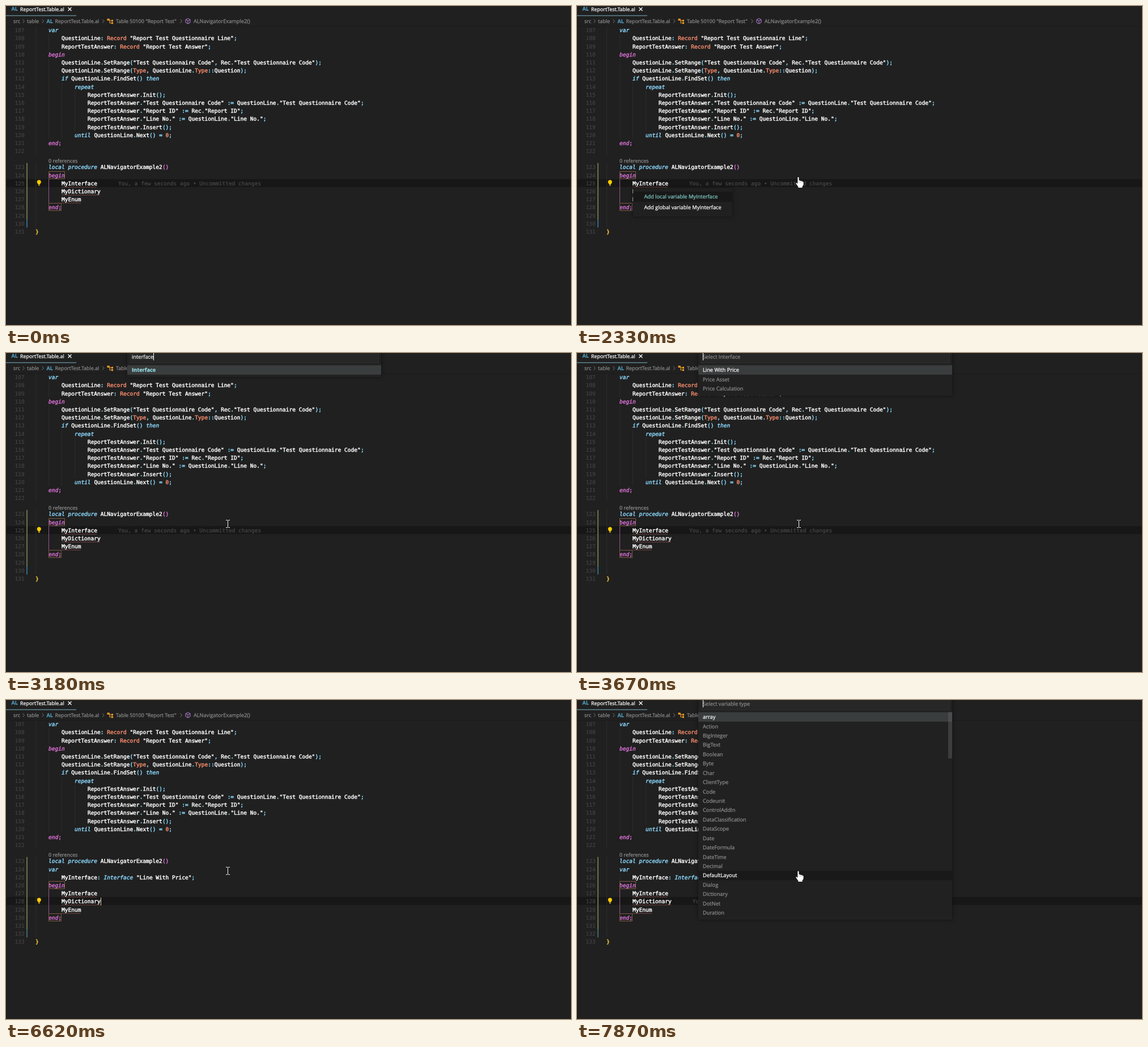
An HTML page with a canvas that plays this animation: 997 by 562 pixels, repeating every 8 s.

```html
<!DOCTYPE html>
<html lang="en">
<head>
<meta charset="utf-8">
<title>Add variable in the editor</title>
<style>
  html, body { margin: 0; width: 100%; height: 100%; overflow: hidden; background: #202020; }
  canvas { display: block; }
</style>
</head>
<body>
<canvas id="stage" width="997" height="562"></canvas>
<script>
const ctx = document.getElementById('stage').getContext('2d');
const LOOP = 8000, X0 = 52.1, CH = 5.738, ROW = 14.2;
const MONO = '9.53px "DejaVu Sans Mono", monospace';
const SANS = '"Open Sans", "Noto Sans", sans-serif';
const C = {
  bg: '#202020', line: '#171717', num: '#434343', guide: '#2b2b2b', text: '#ffffff',
  key: '#8ad6fa', block: '#da70d6', type: '#f78c6c', punct: '#89ddff', dim: '#484848',
  grey: '#8c8c8c', crumb: '#8a8a8a', match: '#80cbc4', wave: '#b0605a', blue: '#519aba'
};

const HEAD = `    var
        QuestionLine: Record "Report Test Questionnaire Line";
        ReportTestAnswer: Record "Report Test Answer";
    begin
        QuestionLine.SetRange("Test Questionnaire Code", Rec."Test Questionnaire Code");
        QuestionLine.SetRange(Type, QuestionLine.Type::Question);
        if QuestionLine.FindSet() then
            repeat
                ReportTestAnswer.Init();
                ReportTestAnswer."Test Questionnaire Code" := QuestionLine."Test Questionnaire Code";
                ReportTestAnswer."Report ID" := Rec."Report ID";
                ReportTestAnswer."Line No." := QuestionLine."Line No.";
                ReportTestAnswer.Insert();
            until QuestionLine.Next() = 0;
    end;
`.split('\n');
const BODY = `    begin
        MyInterface
        MyDictionary
        MyEnum
    end;


}`.split('\n');
const PROC = '    local procedure ALNavigatorExample2()';
const NEW_VAR = ['    var', '        MyInterface: Interface "Line With Price";'];
const WORDS = ['MyInterface', 'MyDictionary', 'MyEnum'];

const TYPES = ('array Action BigInteger BigText Boolean Byte Char ClientType Code Codeunit ' +
  'ControlAddIn DataClassification DataScope Date DateFormula DateTime Decimal ' +
  'DefaultLayout Dialog Dictionary DotNet Duration').split(' ');
const IN_TYPES = ('Integer Instream Interface ControlAddIn BigInteger ErrorInfo ModuleDependencyInfo ' +
  'ModuleInfo SessionSettings TextEncoding XmlProcessingInstruction').split(' ');
const PICKS = [
  { from: 2490, to: 2720, hint: 'Select variable type', items: TYPES, hover: 17 },
  { from: 2720, to: 2800, query: 'in', items: IN_TYPES },
  { from: 2800, to: 2950, query: 'inte', items: ['Integer', 'Interface', 'BigInteger'] },
  { from: 2950, to: 3180, query: 'inter', items: ['Interface'] },
  { from: 3180, to: 3580, query: 'interface', items: ['Interface'] },
  { from: 3670, to: 5310, hint: 'Select Interface', items: ['Line With Price', 'Price Asset', 'Price Calculation'] },
  { from: 7870, to: LOOP, hint: 'Select variable type', items: TYPES, hover: 17 }
];
// start, end, x, line number
const CARETS = [
  [400, 930, 161, 125], [1460, 1860, 161, 125], [3580, 3670, 161, 125], [5310, 5380, 161, 125],
  [5380, 5840, 161, 127], [6070, 6390, 161, 128], [6390, 6920, 167, 128]
];

const during = (t, a, b) => t >= a && t < b;
const rowY = n => Math.round(n < 123 ? 42.2 + (n - 107) * ROW : 283.4 + (n - 123) * ROW);
const colX = n => X0 + n * CH;

function rect(x, y, w, h, color) {
  ctx.fillStyle = color;
  ctx.fillRect(x, y, w, h);
}
function path(points, color, width = 1, fill = false) {
  ctx.beginPath();
  points.forEach(([x, y], i) => i ? ctx.lineTo(x, y) : ctx.moveTo(x, y));
  if (fill) {
    ctx.closePath();
    ctx.fillStyle = fill;
    ctx.fill();
  }
  ctx.strokeStyle = color;
  ctx.lineWidth = width;
  ctx.stroke();
}
// a thin outline gives small type its full brightness
function type(str, x, y, color, heft) {
  ctx.fillStyle = ctx.strokeStyle = color;
  ctx.lineWidth = heft;
  ctx.fillText(str, x, y);
  ctx.strokeText(str, x, y);
}
function label(str, x, y, color, size = 9.25, weight = 400) {
  ctx.font = `${weight} ${size}px ${SANS}`;
  type(str, x, Math.round(y + 3.2), color, .25);
  return ctx.measureText(str).width;
}
function mono(str, x, y, color, italic, heft = .45) {
  ctx.font = (italic ? 'italic ' : '') + MONO;
  type(str, x, y + 4, color, heft);
}
function shadowBox(x, y, w, h, color) {
  ctx.save();
  ctx.shadowColor = 'rgba(0,0,0,.5)';
  ctx.shadowBlur = 6;
  rect(x, y, w, h, color);
  ctx.restore();
}

function style(token, line) {
  if (/^(var|if|then|repeat|until|local|procedure|Interface)$/.test(token)) return [C.key, true];
  if (/^(begin|end)$/.test(token)) return [C.block, true];
  if (/^(Record|Type|\d+)$/.test(token)) return [C.type, false];
  if (token === '}') return ['#ffd23c', false];
  if (/^[()]+$/.test(token) && line.includes('procedure')) return [C.block, false];
  if (token === ';' && line.trim() === 'end;') return [C.block, false];
  if (/^["\w]/.test(token)) return [C.text, false];
  return [C.punct, false];
}
function codeLine(line, n) {
  const y = rowY(n);
  mono(String(n), 15.5, y, C.num, false, .2);
  for (const m of line.matchAll(/"[^"]*"|\w+|[()]+|[^\s\w"()]+/g)) {
    mono(m[0], colX(m.index), y, ...style(m[0], line));
  }
}
function squiggle(x, w, y) {
  const pts = [];
  for (let i = 0; i <= w; i += 2) pts.push([x + i, y + (i / 2 % 2 ? 0 : 1.6)]);
  path(pts, C.wave, .6);
}

function chevron(x) {
  path([[x, 23.5], [x + 3, 26.7], [x, 30]], '#777');
}
function header() {
  label('AL', 9.5, 5, C.blue, 9, 700);
  label('ReportTest.Table.al', 25, 5.5, '#fff', 8.9);
  path([[109.5, 2.5], [115.5, 8.5]], '#fff', 1.2);
  path([[115.5, 2.5], [109.5, 8.5]], '#fff', 1.2);
  rect(0, 16.5, 124, 1, '#7fb4c8');
  label('src', 13, 26.5, C.crumb, 9);
  chevron(29.5);
  label('table', 37, 26.5, C.crumb, 9);
  chevron(63.5);
  label('AL', 71.5, 26.5, C.blue, 9, 700);
  label('ReportTest.Table.al', 86.5, 26.5, C.crumb, 8.9);
  chevron(170);
  path([[180, 24], [183, 24], [183, 30], [187, 30]], '#ee9d28', 1.1);
  path([[183, 26], [187, 26]], '#ee9d28', 1.1);
  rect(178.5, 22.3, 4, 3.4, '#ee9d28');
  rect(186, 24.3, 3, 3, '#ee9d28');
  rect(186, 28.5, 3, 3, '#ee9d28');
  label('Table 50100 "Report Test"', 194, 26.5, C.crumb, 8.95);
  chevron(307.5);
  path([[321, 22], [325, 24], [325, 29], [321, 31.3], [317, 29], [317, 24], [321, 22]], '#b180d7');
  path([[317, 24], [321, 26.3], [325, 24]], '#b180d7');
  path([[321, 26.3], [321, 31.3]], '#b180d7');
  label('ALNavigatorExample2()', 331, 26.5, C.crumb, 9.2);
  rect(0, 35.5, 997, 1, '#1a1a1a');
}

function guide(col, a, b) {
  rect(Math.round(colX(col)), rowY(a) - 7, 1, rowY(b) - rowY(a) + ROW, C.guide);
}
function bulb(y) {
  ctx.beginPath();
  ctx.arc(58.3, y - 2, 3.5, 0, 7);
  ctx.fillStyle = '#ffcc00';
  ctx.fill();
  rect(56.6, y, 3.4, 2.6, '#ffcc00');
  rect(56.8, y + 3.3, 3, 1.4, '#c9a227');
}

function editor(t) {
  const added = t >= 5380;
  const shift = added ? 2 : 0;
  const tail = [PROC, ...(added ? NEW_VAR : []), ...BODY];
  const begin = 124 + shift, end = begin + 4;
  const current = !added ? 125 : t < 6070 ? 127 : 128;

  rect(0, rowY(current) - 7, 997, 14, C.line);
  guide(0, 107, 122);
  guide(0, 123, 130 + shift);
  guide(4, 108, 109);
  guide(4, 111, 120);
  guide(8, 114, 120);
  guide(12, 115, 119);
  if (added) guide(4, 125, 125);

  const split = rowY(130 + shift) - 7;
  rect(36, 276.5, 2, split - 276.5, '#69714b');
  rect(36, split, 2, ROW, added ? '#3f6670' : '#33698c');

  HEAD.forEach((s, i) => codeLine(s, 107 + i));
  label('0 references', 75, 272.5, '#8f8f8f', 8.95);
  tail.forEach((s, i) => codeLine(s, 123 + i));

  const top = rowY(begin), low = rowY(end);
  ctx.lineWidth = 1;
  ctx.strokeStyle = '#7c5945';
  ctx.strokeRect(75.5, top - 6.5, 28, 13);
  ctx.strokeRect(75.5, low - 6.5, 22, 13);
  path([[75.5, top + 7], [75.5, low - 7]], '#94578d');

  // the diagnostics follow the moved lines late
  const first = t < 6220 ? 125 : 127;
  WORDS.forEach((w, i) => squiggle(colX(8), w.length * CH, rowY(first + i) + 6.2));

  if (!added || t >= 6850) {
    const word = added ? WORDS[1] : WORDS[0];
    mono('You, a few seconds ago • Uncommitted changes', colX(8 + word.length) + 37, rowY(current), C.dim, false, .2);
  }
  if (t < 460 || during(t, 690, 5610)) bulb(rowY(125));
  if (t >= 6620) bulb(rowY(128));
  for (const [a, b, x, n] of CARETS) {
    if (during(t, a, b)) rect(x, rowY(n) - 6, 1, 14, '#e6d9a8');
  }
  rect(0, 18, 1, 544, '#171717');
}

function menu(word, n) {
  const y = rowY(n), x = 99;
  ctx.font = `9.25px ${SANS}`;
  const w = ctx.measureText('Add global variable ' + word).width + 39;
  shadowBox(x, y + 9, w, 50, C.bg);
  rect(x, y + 15, w, 18, '#181818');
  label('Add local variable ' + word, 118.5, y + 24, C.match);
  label('Add global variable ' + word, 118.5, y + 43, '#fff');
}

function item(str, query, x, y, color) {
  const at = query ? str.toLowerCase().indexOf(query) : -1;
  if (at < 0) return label(str, x, y, color);
  const cut = at + query.length;
  x += label(str.slice(0, at), x, y, color);
  x += label(str.slice(at, cut), x, y, '#92d8de', 9.25, 700);
  label(str.slice(cut), x, y, color);
}
function picker(p, t) {
  const step = 16.42, n = p.items.length;
  shadowBox(214, -6, 448, 32 + n * step, '#212121');
  rect(218, 0, 439.5, 17, '#272727');
  path([[657.5, 0], [657.5, 17.5], [218, 17.5]], '#2e2e2e');
  let x = 222;
  if (p.query) x += label(p.query, x, 7.2, '#f0f0f0');
  else label(p.hint, x, 7.2, C.grey);
  const blinkOff = during(t, 4130, 4680) || during(t, 5210, 5310);
  if (!blinkOff) rect(Math.round(x), 0, 1, 13, '#fff');
  rect(214, 21.5, 448, 16.6, '#3a3d3d');
  p.items.forEach((s, i) => {
    const y = 30 + i * step;
    if (i === p.hover) rect(214, y - 8.2, 448, step, '#191919');
    item(s, p.query, 222, y, i === 0 || i === p.hover ? '#fff' : C.grey);
  });
  if (n > 20) rect(655, 21.5, 7, 81.5, 'rgba(95,95,95,.45)');
}

function beam(x, y) {
  path([[x + .5, y - 6], [x + .5, y + 6]], '#f4f4f4');
  for (const s of [-1, 1]) {
    path([[x - 3, y + 6.5 * s], [x - .5, y + 6.5 * s], [x + .5, y + 5.8 * s],
      [x + 1.5, y + 6.5 * s], [x + 4, y + 6.5 * s]], '#f4f4f4');
  }
}
function hand(x, y) {
  const shape = [[-2, 1], [-1, 0], [0, 0], [1, 1], [1, 6], [3, 6], [4, 7], [6, 7], [7, 8], [8, 8],
    [9, 9.5], [9, 14], [7, 17], [7, 19.5], [-1, 19.5], [-1, 17.5], [-5, 12], [-5, 10.5],
    [-3.5, 10], [-2, 11.5]].map(([a, b]) => [x + a, y + b]);
  path(shape, '#111', .8, '#fff');
  for (const i of [1, 3.7, 6.4]) path([[x + i, y + 7], [x + i, y + 11]], '#999', .6);
}
// progress in held steps, eased
function stepped(t, a, b, count) {
  const k = Math.floor((t - a) / (b - a) * count + 1e-6) / count;
  const p = Math.min(1, Math.max(0, k));
  return p * p * (3 - 2 * p);
}
function mouse(t) {
  if (t < 70) return;
  if (during(t, 2020, 2420) || during(t, 2490, 2720) || during(t, 7080, 7780) || t >= 7870) return hand(391, 301);
  const a = stepped(t, 70, 460, 5), b = stepped(t, 855, 1230, 5);
  beam(Math.round(594 - 433 * a + 230 * b), Math.round(507 - 191 * a - 15 * b));
}

function draw(t) {
  rect(0, 0, 997, 562, C.bg);
  editor(t);
  header();
  if (during(t, 1860, 2420)) menu(WORDS[0], 125);
  if (during(t, 6930, 7780)) menu(WORDS[1], 128);
  const pick = PICKS.find(p => during(t, p.from, p.to));
  if (pick) picker(pick, t);
  mouse(t);
}

ctx.textRendering = 'geometricPrecision';
ctx.lineJoin = 'round';
const start = performance.now();
function frame() {
  draw((performance.now() - start) % LOOP);
  requestAnimationFrame(frame);
}
frame();
</script>
</body>
</html>
```
